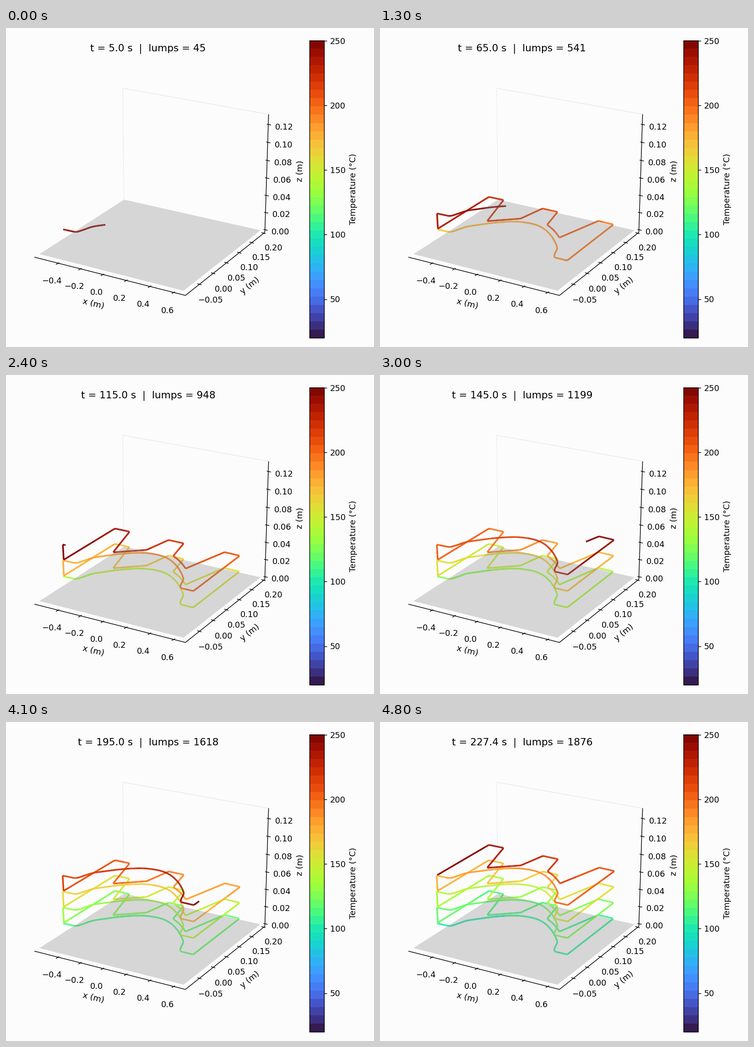
Animation of 804 by 697 pixels, one loop 4900 ms. Source, as a matplotlib script:

```python
import numpy as np
import matplotlib.pyplot as plt
from matplotlib.animation import FuncAnimation
from matplotlib.collections import LineCollection
from matplotlib.colors import ListedColormap

W, H, DPI = 804, 697, 64
PT = 72 / DPI                      # points per pixel
LAYERS, PERIOD, LUMPS = 4, 56.85, 469
T_AMB, T_HOT, COOLING = 20, 250, 124

bands = ListedColormap(plt.get_cmap("turbo")((np.arange(36) + 0.5) / 36))

fig = plt.figure(figsize=(W / DPI, H / DPI), dpi=DPI, facecolor="#fcfcfc")
ax = fig.add_axes([0, 0, 1, 1])
ax.axis("off")


def line(x0, y0, x1, y1, color="black", width=1.45, z=5):
    ax.plot([x0, x1], [y0, y1], color=color, lw=width * PT, zorder=z,
            solid_capstyle="butt")


def label(x, y, s, size=18.06, ha="center", va="baseline", rot=0):
    return ax.text(x, y, s, fontsize=size * PT, family="DejaVu Sans",
                   ha=ha, va=va, rotation=rot, zorder=6)


def num(v, digits):
    return f"{v:.{digits}f}".replace("-", "\u2212")


def draw_axis(ends, ticks, tick_vec, labels):
    line(*ends)
    (ax0, ay0), (ax1, ay1) = tick_vec
    for x, y in ticks:
        line(x + ax0, y + ay0, x + ax1, y + ay1)
    for x, y, s in labels:
        label(x, y + 6.6, s)


def smooth(points, n=8):
    """Catmull-Rom curve through the points."""
    p = np.array(points, float)
    p = np.vstack([2 * p[0] - p[1], p, 2 * p[-1] - p[-2]])
    u = np.linspace(0, 1, n, endpoint=False)[:, None]
    out = [0.5 * (2 * b + (c - a) * u + (2 * a - 5 * b + 4 * c - d) * u**2
                  + (3 * b - a - 3 * c + d) * u**3)
           for a, b, c, d in zip(p, p[1:], p[2:], p[3:])]
    return np.vstack(out + [p[-2:-1]])


# Static scene
line(255, 131.5, 573.5, 188.5, "#e6e6e6", 1.2, 1)
line(255, 131.5, 257.5, 375, "#ececec", 1.2, 1)
ax.fill([73, 388, 556, 258], [494, 574, 442, 375], color="#808080",
        alpha=0.3, lw=0, zorder=3)

draw_axis((62, 500.7, 392, 584.3),
          [(x, 501 + (x - 62) * 0.2515) for x in (114, 163, 212, 263, 315, 367)],
          ((-5, 2.6), (2.4, -1.4)),
          [(x, y, num(v, 1)) for x, y, v in zip(
              (99.5, 148.5, 198, 248.5, 300.5, 353),
              (551, 563, 576, 589, 602.5, 616), np.arange(-2, 4) / 5 + 0.0)])
draw_axis((392, 584.3, 565.5, 446.5),
          [(423, 560), (453, 536), (482, 513), (510, 491), (537, 469), (563, 448.3)],
          ((-5, -1.3), (4.2, 1.2)),
          [(x, y, num(v, 2)) for x, y, v in zip(
              (446.5, 475.5, 504, 531.5, 558, 584.5),
              (593, 569, 545, 522.5, 500.5, 479.5), np.arange(-1, 5) / 20)])
draw_axis((565.5, 446.5, 573.7, 188.5),
          [(573, 211), (571.8, 250), (570.5, 289.5), (569.3, 328),
           (568.1, 366), (566.9, 403.5), (565.7, 441)],
          ((-3.2, -0.8), (6, 1)),
          [(x, y, num(v, 2)) for x, y, v in zip(
              (608, 606.7, 605.3, 604, 602.6, 601.3, 600),
              (215.5, 254.5, 293, 331.5, 369, 406.5, 444), np.arange(6, -1, -1) / 50)])
label(191, 602.5, "x (m)", va="center", rot=-14)
label(533, 563.5, "y (m)", va="center", rot=38.6)
label(643, 312, "z (m)", va="center", rot=88)

# Colour bar
L, R, TOP, BOT = 662.5, 695, 28, 677.3
ax.imshow(np.linspace(1, 0, 648)[:, None], cmap=bands, extent=(L, R, BOT, TOP),
          aspect="auto", interpolation="nearest", vmin=0, vmax=1, zorder=4)
ax.plot([L, R, R, L, L], [TOP, TOP, BOT, BOT, TOP], color="black",
        lw=1.45 * PT, zorder=5)
for v in range(50, 251, 50):
    y = BOT - (v - T_AMB) / (T_HOT - T_AMB) * (BOT - TOP)
    line(R, y, R + 6.3, y)
    label(707.6, y + 6.6, str(v), ha="left")
label(759.5, 352, "Temperature (\u00b0C)", va="center", rot=90)

# Print path of one layer, in screen space
arch = smooth([(150, 445.5), (157, 445), (172, 440), (190, 434), (216, 430),
               (250, 425.5), (290, 423), (318, 425), (342, 430.5), (360, 440),
               (374, 454), (382, 467), (387, 479), (386, 485), (382, 493),
               (380.5, 498), (382, 501.5)])
notch = smooth([(392, 458), (386, 449.5), (377, 439.5), (365, 430)])
path = np.vstack([[(125, 440)], arch, [(409, 508), (510, 429.5), (477, 421.5)],
                  notch, [(388, 402), (355, 394.5), (307, 416.5), (234, 422),
                          (270, 376), (238, 369), (126.5, 438.5)]])

# Length in metres, undoing the oblique view
dx, dy = np.diff(path, axis=0).T
step = np.hypot(425 * dx + 598 * dy, 59 * dx - 246 * dy)
s = np.r_[0, np.cumsum(step)]
u = np.linspace(0, s[-1], LUMPS)
base = np.c_[np.interp(u, s, path[:, 0]), np.interp(u, s, path[:, 1])]

# Nozzle timing within a layer
stops = [(131, 441.5), (216, 430), (422, 498), (447, 434), (392, 458), (272, 419)]
knot_t = np.array([0, 1.3, 5, 24.45, 31.3, 33.15, 45, PERIOD])
knot_count = [0, 10, 45, 211, 261, 271, 380, LUMPS]
knot_node = [0] + [np.argmin(np.hypot(*(base - p).T)) for p in stops] + [LUMPS - 1]
laid = np.interp(np.arange(LUMPS), knot_node, knot_t)
laid[0] = 0.05

lift = np.c_[(base[:, 0] - 255) * 0.003, -(33.5 + 0.018 * (base[:, 1] - 369))]
nodes = np.vstack([base + k * lift for k in range(LAYERS)])
born = np.concatenate([laid + k * PERIOD for k in range(LAYERS)])
segments = np.stack([nodes[:-1], nodes[1:]], axis=1)

END = LAYERS * PERIOD
times = sorted([5.0 * i for i in range(1, 46)]
               + [PERIOD * k for k in range(1, LAYERS + 1)])

bead = LineCollection([], cmap=bands, linewidths=3.6 * PT, zorder=2)
bead.set_clim(T_AMB, T_HOT)
ax.add_collection(bead)
title = label(310.5, 50, "", size=21.67)

ax.set_xlim(0, W)
ax.set_ylim(H, 0)


def lump_count(t):
    layer = min(int((t - 1e-6) // PERIOD), LAYERS - 1)
    part = np.interp(t - layer * PERIOD, knot_t, knot_count)
    return layer * LUMPS + int(round(part))


def update(i):
    t = times[i]
    n = np.searchsorted(born, t + 1e-6) - 1
    age = np.maximum(t - born[1:n + 1], 0)
    bead.set_segments(segments[:n])
    bead.set_array(T_AMB + (T_HOT - T_AMB) / (1 + age / COOLING))
    title.set_text(f"t = {t:.1f} s  |  lumps = {lump_count(t)}")
    return bead, title


anim = FuncAnimation(fig, update, frames=len(times), interval=100, repeat=True)
plt.show()
```
